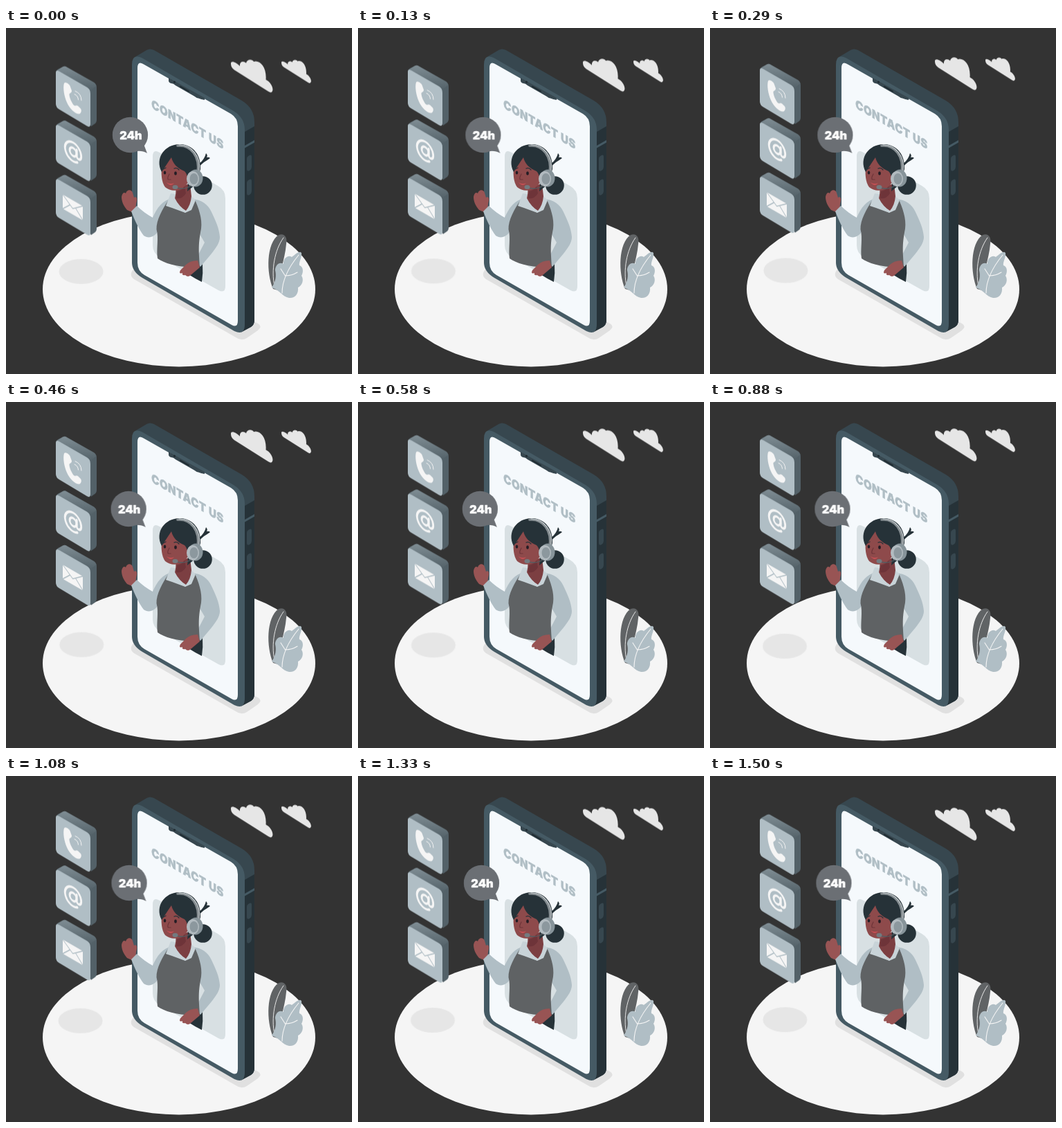
Animation, 500 px wide and 500 px high, one loop 1.54 s. Source, as an HTML page:

```html
<!DOCTYPE html>
<html lang="en">
<head>
<meta charset="utf-8">
<title>Contact us</title>
<style>
html, body { margin: 0; width: 100%; height: 100%; overflow: hidden; background: #333; }
svg { display: block; width: 100vw; height: 100vh; }
text { font-family: Inter, "Open Sans", sans-serif; font-weight: 900; stroke-width: .4; }
.line { fill: none; stroke-linecap: round; stroke-linejoin: round; }
</style>
</head>
<body>
<svg viewBox="0 0 500 500">
  <defs>
    <path id="cloud" d="M325 51.500C325 47 333 50 338 55.500C337 49 343 47 347 51C348 45 356 45 358 49C366 46 377 56 375.500 75C382 78 387 87 385 91.500C384 94 382 94 379 92L330 61C326 58 325 55 325 51.500Z" fill="#e6e6e6"/>
    <linearGradient id="rim" x2="0" y2="1">
      <stop stop-color="#7f8d94"/>
      <stop offset="1" stop-color="#536168"/>
    </linearGradient>
    <g id="tile">
      <path d="M72 66Q72 62 75 60L82 56.500Q85 55 88 57L127 79Q131 82 131 86V133Q131 137 128 139L123 142.500Z" fill="#536168"/>
      <path d="M73 62L82 56.500Q85 55 88 57L127 79Q130 81 130.500 84L121 91.500Z" fill="url(#rim)"/>
      <path d="M72 65Q72 60 77 63L117 86Q122 89 122 95V139Q122 145 117 142L77 118Q72 115 72 110Z" fill="#b0bec5"/>
    </g>
  </defs>

  <ellipse cx="250" cy="377.400" rx="197" ry="112" fill="#f5f5f5"/>
  <ellipse id="shade" cx="108.500" cy="352" rx="32" ry="18" fill="#e6e6e6"/>
  <path d="M184 349Q177 357 185 363L332 447Q340 453 348 448L364 437Q371 431 364 427L350 420Z" fill="#e0e0e0"/>

  <!-- phone -->
  <path d="M184 46Q186 41 193 38L203 32Q208 29 214 32L341 105Q359 116 359 136V422Q359 429 354 432L342 438.500Z" fill="#37474f"/>
  <path d="M345 150L359 142V422Q359 429 354 432L340 439.500Z" fill="#263238"/>
  <path d="M182 53Q182 36 197 43.500L329 120Q345 130 345 147V428Q345 445 330 438L197 361Q182 352 182 339Z" fill="#455a64"/>
  <path d="M190 58Q190 46 200 53L325 124Q335 130 335 142V423Q335 434 326 429L200 357Q190 351 190 339Z" fill="#f5f9fc"/>
  <path d="M235 72V76Q235 79 239 80Q242 80 245 83L272 98.500Q275 101 278 101.500Q282 103 287 104V101Z" fill="#37474f"/>
  <path class="line" d="M252 84.500L264 91.500" stroke="#1f2b31" stroke-width="2"/>
  <circle cx="243.500" cy="78" r="1.600" fill="#1f2b31"/>
  <path d="M345 170L359 162V165.500L345 173.500Z" fill="#455a64"/>
  <path id="key" d="M348 189Q348 186 351 184.500Q355 182 355 186V201Q355 204 352 206Q348 208 348 204Z" fill="#37474f"/>
  <use href="#key" y="35"/>
  <text transform="matrix(.866 .5 0 1 210.300 115.400)" font-size="17.400" letter-spacing=".5" fill="#b0bec5" stroke="#b0bec5">CONTACT US</text>
  <path d="M212 186Q212 174 222 180L306 228Q317 234 317 246V373Q317 384 307 379L222 331Q212 325 212 314Z" fill="#d8e0e3"/>

  <!-- agent -->
  <path d="M268 342L284 340Q285 354 283 367Q273 362 262 355Z" fill="#263238"/>
  <path d="M175 263C170 257 167 251 167 244C168 238 171 237 173 239C175 233 181 233 183 238L185 245C188 243 190 246 189 250C188 254 187 257 188 261L182 266Z" fill="#985454"/>
  <path d="M181 265L189 257C196 264 205 270 212 274C218 260 226 249 240 246L238 280L220 293C215 302 206 305 199 300C192 291 186 278 181 265Z" fill="#b0bec5"/>
  <path d="M268 247C283 248 292 255 297 266C303 279 308 289 309 302C309 310 304 317 297 326L281 345L273 337L287 310L276 291Z" fill="#b0bec5"/>
  <path d="M236 247C226 261 217 278 217.500 291C221 303 217 320 219 333C230 341 252 347 280 345C279 325 277 315 282 290C284 275 278 260 273 248L259 267Z" fill="#5f6264"/>
  <path d="M238 239L231 257L240 260L259 267L268 263L274 249L268 243Z" fill="#c8d3d8"/>
  <path d="M245 230C246 238 245 241 244 246Q250 258 260 264Q267 256 268 243L266 225Z" fill="#7c3f42"/>
  <path d="M226 196C223 209 225 224 230 230C238 237 251 236 258 229L270 216L264 188L238 181Z" fill="#8e4a4b"/>
  <path d="M258 229Q254 235 247 236L246 246Q254 248 260 239Z" fill="#6e3439"/>
  <circle cx="284.500" cy="227.500" r="13.300" fill="#263238"/>
  <path d="M279 196Q287 190 289 181Q292 184 290 187Q293 186 295 188Q291 191 286 194L278 201Z" fill="#263238"/>
  <path d="M225 208C214 187 231 167 252 168C271 169 282 184 281 204L274 226L262 236C264 222 263 212 258 207C248 203 241 196 239 187C234 194 229 202 225 208Z" fill="#263238"/>
  <path class="line" d="M248 170C267 168 281 186 277 210" stroke="#858d91" stroke-width="3.600"/>
  <path class="line" d="M250 169C268 169 282 185 279 206" stroke="#c6cccf" stroke-width="1.200"/>
  <ellipse cx="274" cy="217" rx="10.500" ry="12.500" fill="#87949a"/>
  <ellipse cx="270" cy="218" rx="9" ry="11" fill="#b2bbc0"/>
  <ellipse cx="271.500" cy="218" rx="6" ry="8" fill="#8c989e"/>
  <path class="line" d="M267 228Q258 234 247 231" stroke="#555d62" stroke-width="1.300"/>
  <ellipse cx="244.500" cy="230" rx="4" ry="3" fill="#737b80"/>
  <g fill="#241d25"><ellipse cx="229.500" cy="209" rx="1.800" ry="2.600"/><ellipse cx="245" cy="210" rx="1.900" ry="2.700"/></g>
  <path class="line" d="M227 204L231 202M243 203Q247 201 250 205" stroke="#263238" stroke-width="1.300"/>
  <path class="line" d="M236 211Q232 218 235 219L238 219" stroke="#6e3439" stroke-width="1.200"/>
  <path d="M232 223Q237 227 243 224Q238 230 232 223Z" fill="#d75157"/>
  <path d="M277 336Q266 336 260 342L252 350Q249 356 255 354Q254 358 259 357Q263 361 267 357L280 346Z" fill="#985454"/>

  <!-- leaves -->
  <path d="M386 377C376 354 376 311 394 299C402 296 407 302 405 312C403 336 394 354 393 379Z" fill="#606365"/>
  <path class="line" d="M388 373C383 350 388 321 401 303" stroke="#e6e6e6"/>
  <path d="M384 375C390 366 391 358 389 350C389 343 395 337 401 341C400 333 408 327 413 331C418 327 424 321 427 325C428 331 423 338 424 343C430 345 430 353 427 358C431 364 428 372 422 375C423 385 417 391 409 390C399 388 396 379 384 375Z" fill="#b0bec5"/>
  <path class="line" d="M399 383C399 363 409 345 423 328M404 359L397 348M404 358Q413 358 421 353" stroke="#f5f5f5" stroke-width="1.100"/>

  <g id="clouds">
    <use href="#cloud"/>
    <use href="#cloud" transform="translate(398 47) scale(.71) translate(-325 -47)"/>
  </g>

  <g id="tiles">
    <use href="#tile"/>
    <use href="#tile" y="78.500"/>
    <use href="#tile" y="157"/>
    <path d="M84 80C86 78 91 81 92.500 84L95 91C95 95 91 94 91.500 97C92 102 95 108 98 112C101 114 101 111 104 113L108 117C110 120 108 124 106 124.500C100 125 92 117 88 108C84 99 82 87 84 80Z" fill="#f5f5f5"/>
    <path class="line" d="M99 96Q104 98 104.500 104M100 91.500Q109 95 109 105" stroke="#f5f5f5"/>
    <g class="line" transform="matrix(.866 .5 0 1 97 179.500)" stroke="#f5f5f5" stroke-width="3.400">
      <circle r="5.700"/>
      <path d="M6-6V3C6 8 13.500 7 13.500 0A13.500 13.500 0 1 0 7 11.500"/>
    </g>
    <g transform="matrix(.866 .5 0 1 82 241)">
      <rect width="33.500" height="20.500" rx="1" fill="#f5f5f5"/>
      <path class="line" d="M0 0L16.750 12L33.500 0M0 20.500L12 9M33.500 20.500L21.500 9" stroke="#b0bec5" stroke-width="1.300"/>
    </g>
  </g>

  <g id="bubble">
    <path d="M188 178Q197 177 203.500 181L199 169Z" fill="#6b6f74"/>
    <circle cx="179" cy="154.500" r="25.700" fill="#6b6f74"/>
    <text x="180" y="161" font-size="16.400" text-anchor="middle" fill="#fff" stroke="#fff">24h</text>
  </g>
</svg>
<script>
const LOOP = 1540;
// Each row is [time in ms, distance along the part's direction].
const lift = [[0, 0], [290, -3.8], [460, -5.9], [710, -9.5], [760, -9.6], [1080, -4.8], [1330, -1.4], [LOOP, 0]];
const sway = [[0, 0], [170, 2.4], [290, 1.9], [460, -1.9], [620, -3], [710, -3], [1080, -1], [1330, -0.5], [LOOP, 0]];
const drift = [[0, 0], [290, 0.9], [460, 0.8], [710, 0], [1080, -1], [1330, -0.5], [LOOP, 0]];

function move(id, x, y, steps) {
  const frames = steps.map(([t, d]) => ({ offset: t / LOOP, transform: `translate(${x * d}px, ${y * d}px)` }));
  const run = document.getElementById(id).animate(frames, { duration: LOOP, iterations: Infinity });
  run.startTime = 0;
}

move("tiles", 0, 1, lift);
move("clouds", 0, 1, lift);
move("bubble", 1, 0, sway);
move("shade", 1, -1.7, drift);
</script>
</body>
</html>
```
